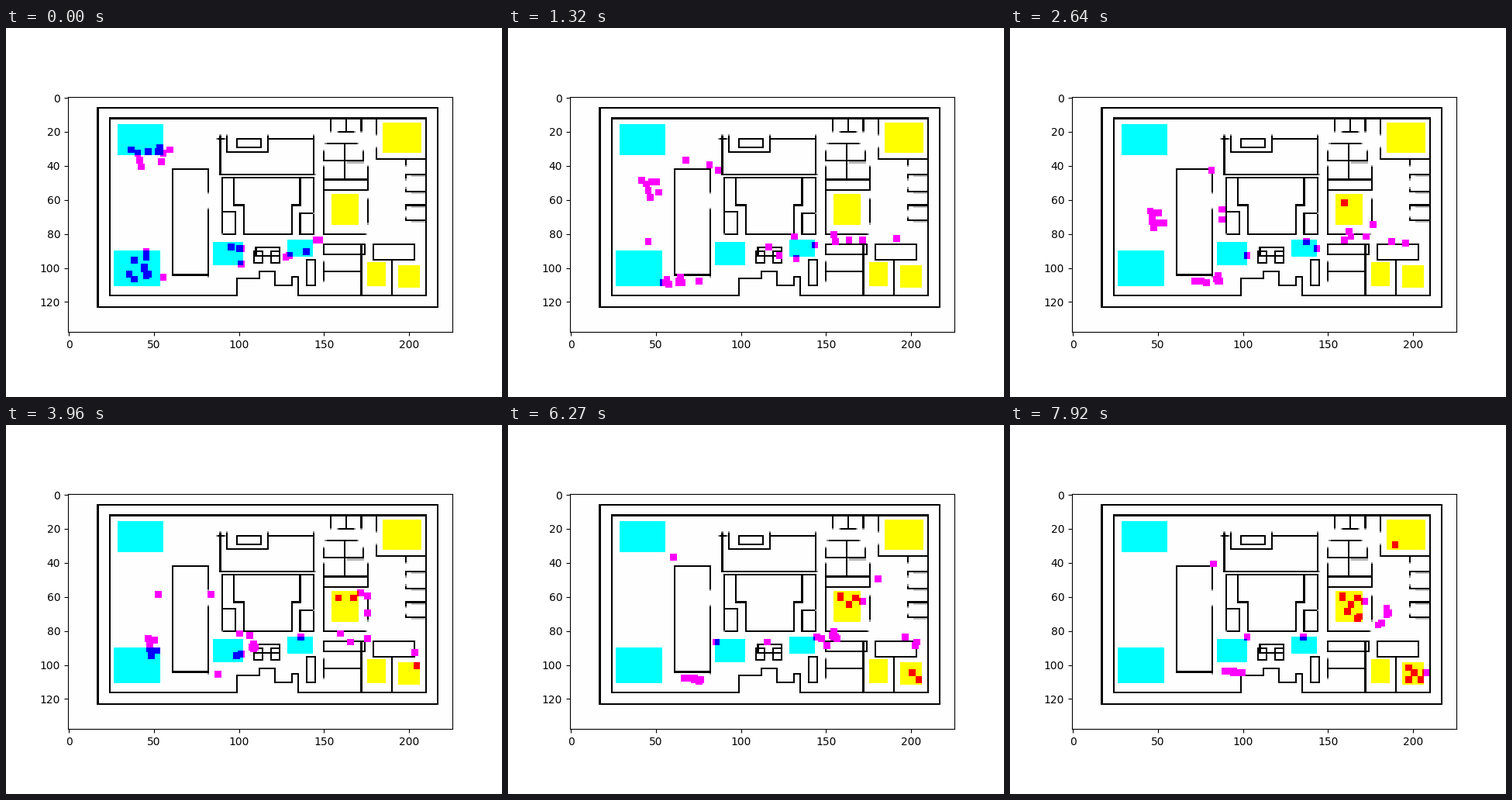
Animation, 640 px wide and 476 px high, one loop 8 s. Source, as a matplotlib script:

```python
import numpy as np
import matplotlib.pyplot as plt
from matplotlib.animation import FuncAnimation

W, H = 226, 138
STEP_MS, TICK_MS, LOOP_MS = 330, 40, 8000
LAST_STEP = LOOP_MS // STEP_MS

WHITE, TIP, BLACK = 254, 140, 0
CYAN, YELLOW = (0, 255, 255), (255, 255, 0)
BLUE, RED, MAGENTA = (0, 0, 255), (255, 0, 0), (255, 0, 255)

plan = np.full((H, W, 3), WHITE, np.uint8)
tint = np.full((H, W, 3), MAGENTA, np.uint8)  # walker colour above each cell


# --- floor plan -----------------------------------------------------------

def wall(*pts):
    """Polyline one cell wide; loose ends fade like a scanned stroke."""
    ink = np.full((H, W), WHITE, np.uint8)
    for (xa, ya), (xb, yb) in zip(pts, pts[1:]):
        ink[min(ya, yb):max(ya, yb) + 1, min(xa, xb):max(xa, xb) + 1] = BLACK
    if pts[0] != pts[-1]:
        for x, y in (pts[0], pts[-1]):
            ink[y, x] = TIP
    plan[:] = np.minimum(plan, ink[..., None])


def hline(y, xa, xb):
    wall((xa, y), (xb, y))


def vline(x, ya, yb):
    wall((x, ya), (x, yb))


def box(xa, ya, xb, yb):
    wall((xa, ya), (xb, ya), (xb, yb), (xa, yb), (xa, ya))


def zone(xa, ya, xb, yb, fill, over):
    plan[ya:yb, xa:xb] = fill
    tint[ya:yb, xa:xb] = over


# outer shell and entrance
box(17, 6, 217, 123)
wall((99, 116), (24, 116), (24, 12), (210, 12), (210, 116), (135, 116),
     (135, 105), (131, 105), (131, 110), (121, 110), (121, 102),
     (112, 102), (112, 106), (99, 106), (99, 116))

# left hall
wall((82, 56), (82, 42), (61, 42), (61, 104), (82, 104))
vline(82, 65, 105)

# upper middle block
wall((89, 22), (89, 45), (145, 45))
hline(24, 87, 92)
wall((93, 22), (93, 32), (117, 32), (117, 22))
wall((117, 24), (144, 24))
vline(144, 22, 45)
box(99, 24, 113, 29)

# lower middle block
wall((90, 80), (90, 47), (144, 47), (144, 80), (136, 80), (136, 68), (144, 68))
wall((90, 67), (98, 67), (98, 80), (90, 80))
wall((97, 47), (97, 63), (103, 63), (103, 80), (131, 80), (131, 63),
     (136, 63), (136, 47))

# upper right rooms
vline(154, 12, 20)
vline(163, 12, 20)
vline(172, 12, 20)
hline(20, 158, 168)
vline(181, 12, 22)
wall((181, 29), (181, 36), (210, 36))
hline(27, 151, 170)
vline(162, 27, 48)
wall((150, 31), (150, 37), (173, 37), (173, 31))
wall((150, 40), (150, 80), (175, 80))
hline(48, 150, 176)
wall((176, 40), (176, 54), (150, 54))
vline(176, 59, 74)
plan[38, 164:174] = 180

# stalls on the right
vline(198, 36, 40)
for y, end in ((45, 48), (55, 53), (63, 66), (72, 70)):
    wall((198, end), (198, y), (210, y))
    plan[y + 1, 202:210] = 190

# lower right rooms
box(150, 86, 174, 92)
vline(172, 86, 116)
vline(150, 96, 108)
hline(102, 150, 172)
box(179, 86, 203, 95)
vline(190, 95, 116)

# pillar and tables
box(140, 95, 145, 110)
wall((110, 93), (110, 88), (124, 88), (124, 97))
for x in (109, 119):
    box(x, 90, x + 5, 97)
hline(93, 109, 124)

zone(29, 16, 56, 34, CYAN, BLUE)
zone(27, 90, 54, 111, CYAN, BLUE)
zone(85, 85, 103, 99, CYAN, BLUE)
zone(129, 84, 144, 94, CYAN, BLUE)
zone(185, 15, 208, 33, YELLOW, RED)
zone(155, 57, 171, 75, YELLOW, RED)
zone(176, 97, 187, 111, YELLOW, RED)
zone(194, 99, 207, 112, YELLOW, RED)


# --- walkers --------------------------------------------------------------

walkers = []


def walk(starts, route, pace, gain=0.0, spread=0.3):
    """Send a group along one route; each keeps part of its place in the group.

    After t steps a walker has covered pace * t + gain * t**2 cells,
    where a diagonal move costs the same as a straight one.
    """
    starts, route = np.array(starts, float), np.array(route, float)
    for start in starts:
        lane = spread * (start - starts.mean(axis=0))
        path = np.vstack([start, route + lane])
        legs = np.abs(np.diff(path, axis=0)).max(axis=1)
        walkers.append((np.r_[0, legs.cumsum()], path, pace, gain))


DOOR = (177, 78)
CROSSING = (181, 80)
SOUTH = [(58, 109), (87, 107), (104, 92), (122, 84), (160, 83)]
EAST = [(160, 84), (190, 85), (206, 87)]

# upper left zone: down the hall, or over the top of the block
walk([(37, 31), (41, 33), (47, 32), (53, 32), (55, 38), (42, 37), (43, 41)],
     [(48, 60), (49, 84), (50, 98), (64, 110), (84, 107), (104, 102), (127, 82)],
     pace=4.5)
walk([(56, 33)],
     [(58, 27), (68, 37), (81, 40), (84, 56), (84, 71), (87, 91), (109, 82)],
     pace=4)
walk([(54, 30), (60, 31)],
     [(87, 42), (89, 82), (117, 83), (134, 99), (161, 83), DOOR, (161, 69)],
     pace=7.1, spread=0)

# lower left zone: along the south side, speeding up in the corridor
walk([(46, 94), (45, 101), (36, 104), (39, 107), (47, 104), (46, 105)],
     SOUTH + [CROSSING, (191, 52)], pace=4.4, gain=0.07)
walk([(45, 100)], SOUTH + [DOOR, (169, 72)], pace=4.4, gain=0.07)
walk([(46, 91)], SOUTH, pace=4)
walk([(56, 106)], SOUTH + [CROSSING, (181, 46), (182, 26), (190, 30)],
     pace=4.4, gain=0.2)
walk([(39, 96)], [(41, 89), (54, 78), (55, 63), (49, 48), (55, 36), (83, 41)],
     pace=2.7, gain=0.045)

# middle zones: to the far east room
walk([(96, 88), (102, 98)], [(123, 90)] + EAST + [(207, 98), (195, 108)],
     pace=5.3, spread=0.5)
walk([(128, 94)], [(142, 87)] + EAST + [(208, 105)], pace=4)
walk([(140, 91)], EAST + [(201, 105)], pace=6)
walk([(148, 84)], EAST + [(205, 109)], pace=6)

# middle zones: through the door into the centre room
walk([(146, 84)], [(199, 83), DOOR, (159, 61)], pace=11.5)
walk([(130, 93)], [(154, 81), DOOR, (178, 57), (159, 60)], pace=6.2)
walk([(102, 89)], [(122, 100), (162, 82), DOOR, (168, 61)], pace=7.7)
walk([(101, 89)], [(136, 81), DOOR, (176, 58), (164, 65)], pace=7.8)
walk([(140, 91)], [(142, 88), CROSSING, (172, 63)], pace=4.3)


def scene(step):
    img = plan.copy()
    for reach, path, pace, gain in walkers:
        done = pace * step + gain * step ** 2
        x, y = (int(round(np.interp(done, reach, axis))) for axis in path.T)
        cell = np.s_[y - 2:y + 2, x - 2:x + 2]
        img[cell] = tint[cell]
    return img


fig, ax = plt.subplots(figsize=(6.4, 4.76), dpi=100)
fig.subplots_adjust(left=0.125, right=0.9, bottom=0.11, top=0.88)
picture = ax.imshow(scene(0), interpolation="nearest")


def update(i):
    step = min((i * TICK_MS + 30) // STEP_MS, LAST_STEP)
    picture.set_data(scene(step))
    return (picture,)


anim = FuncAnimation(fig, update, frames=LOOP_MS // TICK_MS, interval=TICK_MS,
                     repeat=True, repeat_delay=0)
plt.show()
```
